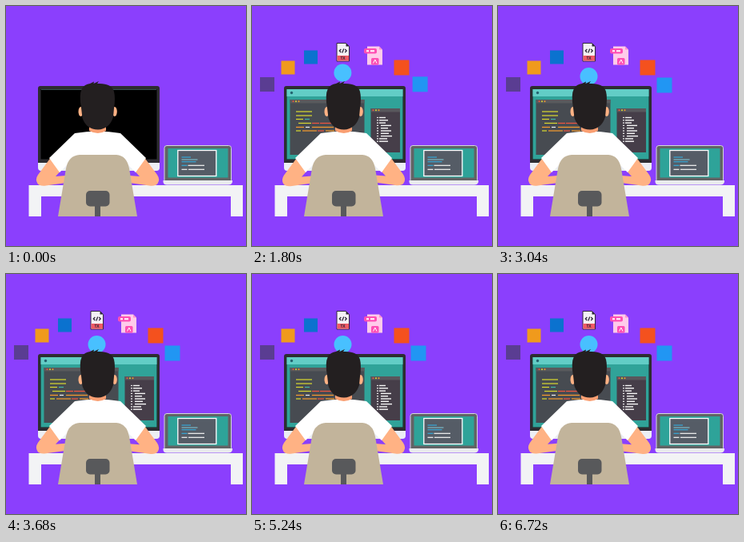
An HTML page that plays this animation: 300x300 px, repeating every 6760 ms.

```html
<!DOCTYPE html>
<html lang="en">
<head>
<meta charset="utf-8">
<title>Developer at desk</title>
<style>
  html, body { margin: 0; width: 100%; height: 100%; overflow: hidden; background: #8b3ffd; }
  svg { display: block; width: 100vw; height: 100vh; }
  text { font-family: "Open Sans", Arial, sans-serif; font-weight: 700; text-anchor: middle; }
</style>
</head>
<body>
<svg viewBox="0 0 300 300">
  <rect width="300" height="300" fill="#8b3ffd"/>

  <!-- Icons are centred on 0,0 and rise from behind the monitor -->
  <g id="icons">
    <rect x="-8.5" y="-9" width="18" height="18" fill="#5a3d92"/>
    <rect x="-8.5" y="-9" width="17" height="17" fill="#f09a1c"/>
    <rect x="-8.5" y="-9" width="17" height="17" fill="#0b72cf"/>
    <g>
      <path d="M-7.500-11.500H4L8-7.500V11H-7.500Z" fill="#f4f1f6" stroke="#30283a"/>
      <path d="M4-11.500V-7.500H8Z" fill="#30283a"/>
      <path d="M-2.200-4L-4.200-2L-2.200 0M2.700-4L4.700-2L2.700 0M1.200-4.500L-.7 .5" fill="none" stroke="#30283a" stroke-width="1.300"/>
      <rect x="-7" y="4" width="14.500" height="6.500" fill="#f05a66"/>
      <text y="9.200" font-size="5" fill="#30283a">TX</text>
    </g>
    <g>
      <path d="M-9-11.500H6L10-7.500V11.500H-9Z" fill="#ffcbea"/>
      <path d="M6-11.500V-7.500H10Z" fill="#ff8fd0"/>
      <rect x="-13" y="-9" width="16" height="6.500" rx="2" fill="#ff4fb4"/>
      <path d="M-10-5.800h3M-5-5.800h5" stroke="#fff" stroke-width="2"/>
      <rect x="-4" y="3" width="9.500" height="8.500" rx="1.500" fill="#ff4fb4"/>
      <path d="M-1.500 9.500L.8 5L3 9.500" fill="none" stroke="#fff"/>
    </g>
    <rect x="-9.500" y="-10" width="19" height="19" fill="#f4511e"/>
    <rect x="-9.500" y="-9.500" width="19" height="19" fill="#2196f3"/>
    <circle r="11" fill="#48c0ff"/>
  </g>

  <!-- Monitor -->
  <rect x="40" y="180" width="152" height="26" rx="4" fill="#eceef4"/>
  <path d="M40 196V103Q40 100 43 100H189Q192 100 192 103V196Z" fill="#2d2c31"/>
  <rect x="43.500" y="104" width="145" height="87.500" fill="#000"/>
  <path d="M44 104.500H188" stroke="#35504f"/>
  <g id="screen">
    <rect x="43.500" y="104" width="145" height="87.500" fill="#30a399"/>
    <rect x="43.500" y="104" width="145" height="9" fill="#62cdc6"/>
    <circle cx="49.500" cy="108.500" r="1.700" fill="#23636f"/>
    <rect x="47.500" y="117" width="93" height="69" fill="#474b51"/>
    <rect x="47.500" y="117" width="93" height="4.500" fill="#595a5d"/>
    <rect x="148.500" y="128" width="36.500" height="55" fill="#463e49"/>
    <rect x="148.500" y="128" width="36.500" height="4.500" fill="#59575c"/>
    <g id="dots"></g>
    <g id="code"></g>
  </g>

  <!-- Laptop -->
  <rect x="198" y="174.500" width="83.500" height="46" rx="3" fill="#626365" stroke="#d5d8da"/>
  <rect x="202.500" y="178" width="75" height="36.500" fill="#2ea399"/>
  <rect x="214.800" y="180.500" width="48" height="32" fill="#555c66" stroke="#fff" stroke-width="1.300"/>
  <g id="notes"></g>
  <path d="M196.500 218H283V220Q282 223.500 278 223.500H201Q197 223.500 196.500 220Z" fill="#e9ebed"/>

  <path d="M28.500 224H296V263H281V238H44V263H28.500Z" fill="#f2f3f5"/>

  <!-- Person -->
  <g fill="#ffb284">
    <path id="left" d="M57 188L40 211Q36 217 39.500 222Q42 225.500 50 224.500L75 221V212L62 213L72 202Z"/>
    <path id="right" d="M172 188L189 211Q193 217 189.500 222Q187 225.500 179 224.500L154 221V212L167 213L157 202Z"/>
  </g>
  <path d="M86 159Q115 154 143 159L175 190L162 208L152 198V225H77V198L67 208L54 190Z" fill="#fff"/>
  <path d="M104 145H125V156Q115 162 104 156Z" fill="#f99f72"/>
  <g fill="#ffb284">
    <ellipse cx="93.500" cy="132" rx="3" ry="6"/>
    <ellipse cx="135.800" cy="132" rx="3" ry="6"/>
  </g>
  <path d="M94 127Q91 111 95 103Q98 98 105 97L110 94.500L109.500 97L116 94L114 97Q132 96 135 107Q137 115 135 128L134 139Q129 154 115 154.500Q100 154 95.500 140Z" fill="#231f20"/>

  <!-- Chair -->
  <path d="M65 263L75 203Q78 187 92 186H138Q151 187 154 203L164 263Z" fill="#c2b49b"/>
  <rect x="111" y="248" width="7" height="15" fill="#58595b"/>
  <rect x="100" y="231" width="29.500" height="19.500" rx="5" fill="#58595b"/>
</svg>
<script>
const LOOP = 6760, FLIGHT = 800, STAGGER = 120, FIRST = 384;
const origin = [115, 150];
const rest = [[18.5, 98], [45, 77.5], [73.5, 64.5], [113.5, 58], [153, 62], [187, 77.5], [208, 99], [113.5, 88]];
const get = id => document.getElementById(id);
const icons = [...get("icons").children];
const clamp = v => Math.max(0, Math.min(1, v));
const backOut = p => 1 + 2.70158 * (p - 1) ** 3 + 1.70158 * (p - 1) ** 2;
const line = (x, y, w, color, h = 1.2) =>
  `<rect x="${x}" y="${y - h / 2}" width="${w}" height="${h}" fill="${color}"/>`;

const yellow = "#d9d92f", red = "#f0553f", orange = "#f79a2d", white = "#f5f5f5", blue = "#36a8d8";
get("code").innerHTML = [
  [55, 132, 20, yellow], [55, 137, 20, yellow], [55, 141.5, 9, yellow], [66, 141.5, 6, "#42b6a6"],
  [58, 146.5, 16, yellow], [75, 146.5, 9, red], [85, 146.5, 17, red],
  [55, 151.5, 10, orange], [67, 151.5, 5, white], [75, 151.5, 27, orange],
  [55, 156, 6, yellow], [63, 156, 18, orange], [82, 156, 8, red], [92, 156, 11, orange]
].map(a => line(...a)).join("") +
  [8, 11, 8, 13, 9, 13, 10, 14, 10, 11].map((w, i) => {
    const y = 139.5 + i * 3.3, x = 159 + (i > 2 && i < 8 ? 2 : 0);
    return line(156, y, 2, white) + line(x, y, w, white, 1.4);
  }).join("");

const dot = (x, y, color) => `<circle cx="${x}" cy="${y}" r="1" fill="${color}"/>`;
get("dots").innerHTML = [[51.5, 119.2], [151.5, 130.2]].map(([x, y]) =>
  [red, yellow, orange].map((c, i) => dot(x + i * 3.5, y, c)).join("")).join("");

get("notes").innerHTML = [
  [219.5, 189, 11.5, blue], [219.5, 192, 20, "#7bb8c5"], [219.5, 194.7, 18, blue],
  [219.5, 199.3, 7, blue], [227.5, 199.3, 20.5, white],
  [219.5, 204.3, 7, white], [228, 204.3, 20, white]
].map(a => line(...a)).join("");

function draw(now) {
  const t = now % LOOP;
  get("screen").setAttribute("opacity", clamp((t - 80) / 300));
  icons.forEach((icon, i) => {
    const p = clamp((t - FIRST - i * STAGGER) / FLIGHT), k = backOut(p);
    const [x, y] = origin.map((o, j) => o + (rest[i][j] - o) * k);
    icon.setAttribute("transform", `translate(${x} ${y})`);
    icon.setAttribute("visibility", p > 0 ? "visible" : "hidden");
  });
  // Gentle alternating typing motion
  const tap = 0.5 * Math.sin(2 * Math.PI * t / 338);
  get("left").setAttribute("transform", `translate(0 ${tap})`);
  get("right").setAttribute("transform", `translate(0 ${-tap})`);
}

let start;
function tick(now) {
  start ??= now;
  draw(now - start);
  requestAnimationFrame(tick);
}
draw(0);
requestAnimationFrame(tick);
</script>
</body>
</html>
```
